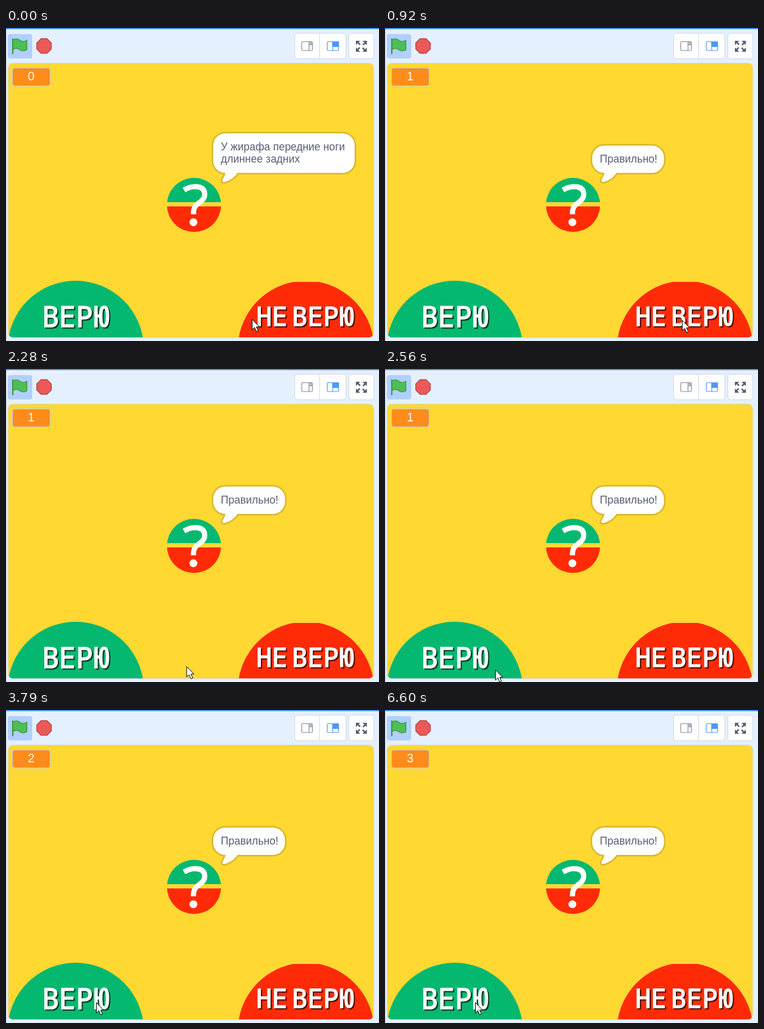
An HTML page for the animation above (7990 ms loop, 613x514 px).

```html
<!DOCTYPE html>
<html lang="ru">
<head>
<meta charset="utf-8">
<title>Верю — не верю</title>
<style>
  html, body { margin: 0; width: 100%; height: 100%; overflow: hidden; background: #e5f0ff; }
  svg { display: block; width: 613px; height: 514px; }
  text { font-family: "Liberation Sans", sans-serif; }
  .panel { fill: #fff; stroke: #cfd9e6; }
  .label { font-family: "Noto Sans Mono", monospace; fill: #fff; stroke: #fff; stroke-width: 1.5px; text-anchor: middle;
    word-spacing: -19px; filter: drop-shadow(2px 2px 0 rgba(0, 0, 0, .7)); }
  #score { font-size: 20px; fill: #fff; text-anchor: middle; }
  #bubble { fill: #fff; stroke: #d9b72b; stroke-width: 5px; paint-order: stroke; }
  #speech { font-size: 17.5px; fill: #575e75; }
</style>
</head>
<body>
<svg viewBox="0 0 613 514">
  <defs>
    <clipPath id="stage"><rect x="3.5" y="57.5" width="601" height="451" rx="8"/></clipPath>
    <clipPath id="ball"><circle cx="309" cy="290.5" r="44.5"/></clipPath>
    <path id="arrow" d="M-9-9h7l-2.3 2.3 3.1 3.1-1.8 1.8-3.1-3.1L-9-2z"/>
  </defs>

  <rect width="613" height="514" fill="#e5f0ff"/>
  <rect width="613" height="2" fill="#4c97ff"/>
  <rect width="1" y="2" height="512" fill="#c3cddb"/>

  <rect x="3" y="10" width="40" height="40" rx="4" fill="#b0d0ff"/>
  <g transform="translate(10 17) scale(1.5)" fill="#4cbf56" stroke="#45993d" stroke-linecap="round" stroke-linejoin="round">
    <path d="M.75 2a6.44 6.44 0 0 1 7.69 0a6.44 6.44 0 0 0 7.69 0v10.4a6.44 6.44 0 0 1-7.69 0a6.44 6.44 0 0 0-7.69 0"/>
    <path d="M.75 16.75v-16" stroke-width="1.5"/>
  </g>
  <path d="M57.6 17.5h9.8l7 7v10l-7 7h-9.8l-7-7v-10z" fill="#ec5959" stroke="#b84848" stroke-width="1.5" stroke-linejoin="round"/>

  <rect class="panel" x="474.5" y="8.5" width="84" height="42" rx="4"/>
  <path class="panel" d="M515.5 9v41"/>
  <rect class="panel" x="563.5" y="8.5" width="41" height="42" rx="4"/>
  <g fill="none" stroke="#858a99" stroke-width="1.2">
    <rect x="486" y="22.5" width="17.5" height="14.5" rx="1.5"/>
    <path d="M498 22.5v14.5M498 27.5h5"/>
    <path d="M499 23h4v4h-4z" fill="#b5b9c4" stroke="none"/>
  </g>
  <g fill="none" stroke="#4c97ff" stroke-width="1.2">
    <rect x="528" y="22.5" width="18.5" height="14.5" rx="1.5"/>
    <path d="M537 22.5v14.5"/>
    <path d="M537 22.5h9.5v8h-9.5z" fill="#4c97ff"/>
  </g>
  <g transform="translate(584 30)" fill="#575e75">
    <use href="#arrow"/>
    <use href="#arrow" transform="rotate(90)"/>
    <use href="#arrow" transform="rotate(180)"/>
    <use href="#arrow" transform="rotate(270)"/>
  </g>

  <g clip-path="url(#stage)">
    <rect x="3" y="57" width="602" height="452" fill="#ffd832"/>
    <circle cx="114.5" cy="527" r="112" fill="#04b86f"/>
    <path d="M381 527A112 112 0 0 1 471.9 417h42.2A112 112 0 0 1 605 527z" fill="#ff2b06"/>
  </g>
  <rect x="3.5" y="57.5" width="601" height="451" rx="8" fill="none" stroke="#d3dbe4"/>
  <text class="label" x="115" y="490.5" font-size="46.5">ВЕРЮ</text>
  <text class="label" x="492" y="489" font-size="43">НЕ ВЕРЮ</text>

  <g clip-path="url(#ball)">
    <path d="M264 246h90v40h-90z" fill="#04b86f"/>
    <path d="M264 293h90v43h-90z" fill="#ff2b06"/>
  </g>
  <path d="M292.5 266Q302 260.5 310.5 260.5Q326.5 260.5 326.5 273C326.5 281 321 284 316 288C309.5 293 308 297 308 306" fill="none" stroke="#fff" stroke-width="8.5"/>
  <circle cx="308" cy="319" r="6.5" fill="#fff"/>

  <rect x="10.5" y="65.5" width="62" height="29.5" rx="4" fill="#ff8c1a" stroke="#c4ccd9" stroke-width="1.25"/>
  <text id="score" x="41.3" y="86.3"></text>

  <path id="bubble"/>
  <g id="speech"></g>

  <path id="cursor" d="M0 0v17l4-3.7 3 6.7 3-1.3-3-6.4h5z" fill="#fff" stroke="#000" stroke-linejoin="round"/>
</svg>
<script>
const LOOP = 7990;
const $ = id => document.getElementById(id);

// Each scene: start time, score, right edge of the bubble, lines of speech
const CORRECT = [458.5, "Правильно!"];
const scenes = [
  [0, 0, 573, "У жирафа передние ноги", "длиннее задних"],
  [920, 1, ...CORRECT],
  [2870, 1, 560.5, "Сердце синего кита по", "размеру сравнимо с", "автомобилем"],
  [3730, 2, ...CORRECT],
  [5720, 2, 549.5, "Муравей живет 20 лет"],
  [6540, 3, ...CORRECT],
];

// Each move: start time, steps, step length, target x and y, upward bow
const moves = [
  [60, 6, 60, 486.5, 480.5, 18],
  [610, 1, 60, 488.5, 480, 0],
  [1920, 12, 58.1, 181.5, 494, 0],
  [3050, 4, 60, 148.5, 480.5, 0],
];

function bubblePath(right, lines) {
  const left = 340.5, bottom = 238, r = 20;
  const width = right - left, height = 25 + 20 * lines;
  const corner = (x, y) => `a${r} ${r} 0 0 0 ${x} ${y}`;
  return `M${left + r} ${bottom}c0 5-5 10-5 12.5q0 2.5 2.5 2.5c3.75 0 16.25-5 22.5-15`
    + `H${right - r}${corner(r, -r)}v${2 * r - height}${corner(-r, -r)}`
    + `h${2 * r - width}${corner(-r, r)}v${height - 2 * r}${corner(r, r)}z`;
}

let current;
function showScene(scene) {
  if (scene === current) return;
  current = scene;
  const [, score, right, ...lines] = scene;
  $("score").textContent = score;
  $("bubble").setAttribute("d", bubblePath(right, lines.length));
  $("speech").innerHTML = lines.map((line, i) =>
    `<text x="353" y="${221 - 20 * (lines.length - 1 - i)}">${line}</text>`).join("");
}

function cursorAt(t) {
  let x = 404.5, y = 478.5;
  for (const [start, steps, length, toX, toY, bow] of moves) {
    if (t < start) break;
    const p = Math.min(1, (Math.floor((t - start) / length) + 1) / steps);
    const eased = p * p * (3 - 2 * p);
    x += (toX - x) * eased;
    y += (toY - y) * eased - bow * Math.sin(Math.PI * p);
  }
  return [x, y];
}

function draw() {
  const t = performance.now() % LOOP;
  showScene(scenes.findLast(([start]) => t >= start));
  $("cursor").setAttribute("transform", `translate(${cursorAt(t)})`);
  requestAnimationFrame(draw);
}
draw();
</script>
</body>
</html>
```
